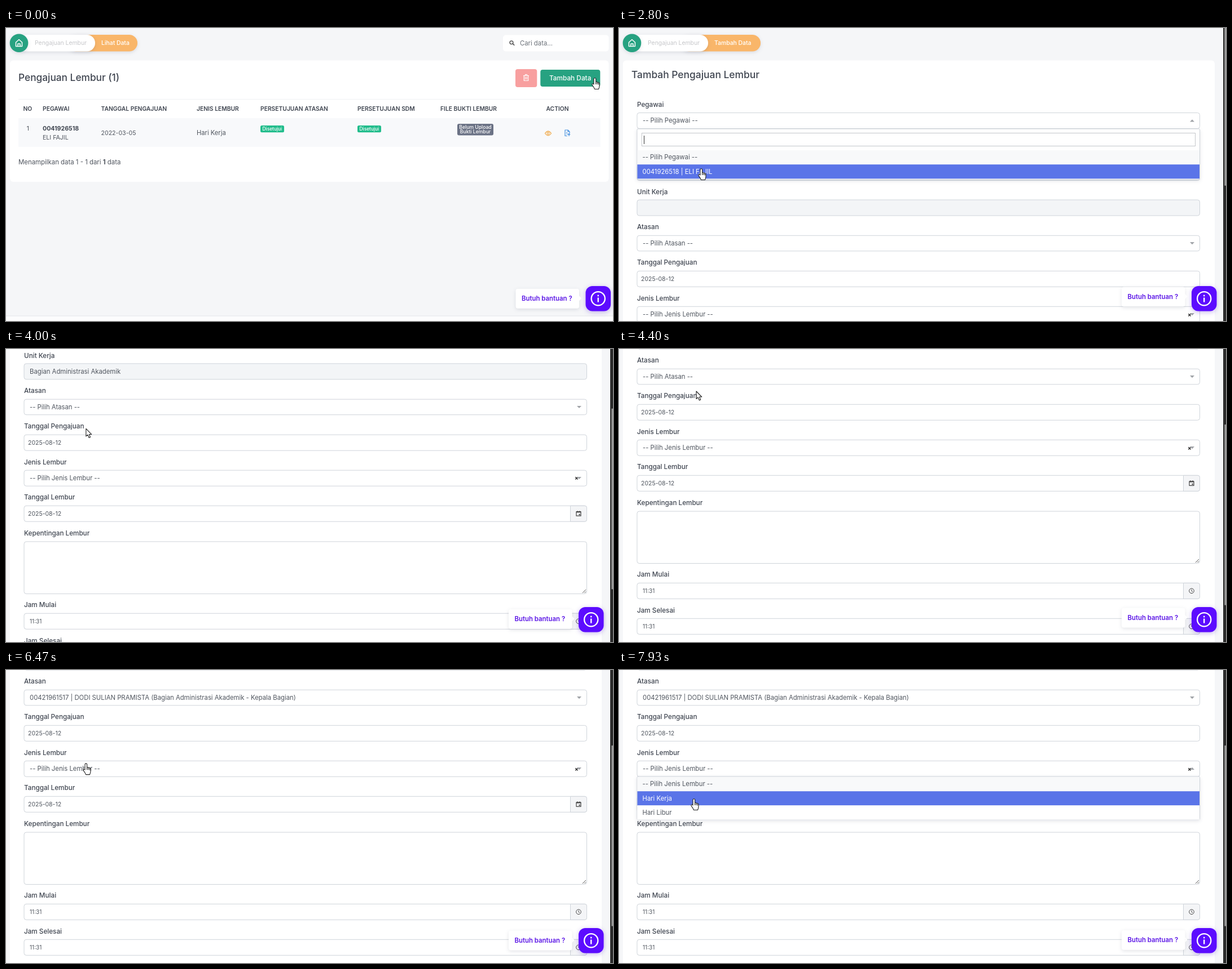
Animation of 1076 by 520 pixels, one loop 8 s. Source, as an HTML page:

```html
<!DOCTYPE html>
<html lang="id">
<head>
<meta charset="utf-8">
<title>Pengajuan Lembur</title>
<style>
html, body { margin: 0; width: 100%; height: 100%; overflow: hidden; background: #f5f6f8; }
svg { display: block; }
text { font-family: Inter, "Open Sans", sans-serif; white-space: pre; }
.soft { filter: drop-shadow(0 2px 3px rgba(40, 50, 80, .13)); }
.glow { filter: drop-shadow(0 2px 4px rgba(70, 20, 200, .3)); }
</style>
</head>
<body>
<svg id="stage" width="1076" height="520" viewBox="0 0 1076 520"></svg>
<script>
const LOOP = 8000, FORM_AT = 1670;
const DARK = '#3f4550', GREY = '#50565f', LINE = '#cfd4da', GREEN = '#27a281', BLUE = '#5a74e8', PURPLE = '#5c0cff';
const ID = '0041926518', NAME = 'ELI FAJIL', EMPLOYEE = `${ID} | ${NAME}`;
const MANAGER = '00421961517 | DODI SULIAN PRAMISTA (Bagian Administrasi Akademik - Kepala Bagian)';

// y is the middle of the capitals
const text = (x, y, s, size = 11.4, fill = GREY, weight = 400, extra = '') =>
  `<text x="${x}" y="${y + size * .36}" font-size="${size}" fill="${fill}" font-weight="${weight}" ${extra}>${s}</text>`;
const rect = (x, y, w, h, fill, r = 0, extra = '') =>
  `<rect x="${x}" y="${y}" width="${w}" height="${h}" rx="${r}" fill="${fill}" ${extra}/>`;
const path = (d, stroke, width = 1, fill = 'none', extra = '') =>
  `<path d="${d}" stroke="${stroke}" stroke-width="${width}" fill="${fill}" stroke-linejoin="round" ${extra}/>`;
const group = (id, body, extra = '') => `<g id="${id}" ${extra}>${body}</g>`;
const box = (y, h = 28, fill = '#fff') => rect(32, y, 997.5, h, fill, 4, `stroke="${LINE}"`);

function breadcrumb(last, end) {
  return rect(110, 12, end - 110, 29.5, '#f9b66a', 14.7, 'class="soft"') +
    rect(20, 12, 138, 29.5, '#fff', 14.7, 'class="soft"') +
    `<circle cx="23" cy="26.8" r="16.3" fill="${GREEN}" class="soft"/>` +
    path('M17.5 25.5l5.5-5 5.5 5v7h-11zM21 32.5v-4.5h4v4.5', '#fff', 1.5) +
    text(51, 26.3, 'Pengajuan Lembur', 10.4, '#c6c7ca') +
    text(169, 26.3, last, 10.4, '#fff', 500);
}

function listPage() {
  const heads = [[30.5, 'NO'], [65, 'PEGAWAI'], [168.5, 'TANGGAL PENGAJUAN'], [338, 'JENIS LEMBUR'],
    [451, 'PERSETUJUAN ATASAN'], [623, 'PERSETUJUAN SDM'], [770, 'FILE BUKTI LEMBUR'], [957.5, 'ACTION']];
  const approved = x => rect(x, 173, 42, 12.3, '#22bd8c', 2.5) + text(x + 3.5, 179, 'Disetujui', 8.4, '#fff', 500);
  const middle = 'text-anchor="middle"';
  return breadcrumb('Lihat Data', 233) +
    rect(881, 12.5, 187.5, 29, '#fff', 5) +
    path('M898.6 28l2.6 2.8', '#444', 1.5) +
    '<circle cx="896" cy="25.8" r="2.9" fill="none" stroke="#444" stroke-width="1.3"/>' +
    text(911, 27, 'Cari data...', 11.3, '#6a7078') +
    rect(7, 57.5, 1061.5, 215.5, '#fff', 6) +
    text(22, 88, 'Pengajuan Lembur (1)', 17.3, DARK, 500) +
    rect(903, 73, 38.3, 32, '#f89f9f', 4) +
    path('M917 84.5h10M920.5 84v-1.5h3v1.5M918.3 84.5v9h7.4v-9M920.7 86.5v5M923.3 86.5v5', '#fff', 1.2) +
    rect(947.3, 74, 106, 30, GREEN, 4) +
    group('ring', rect(946.6, 73.2, 107.4, 31.6, 'none', 5, 'stroke="#9fdcc8" stroke-width="2"')) +
    text(963, 88.3, 'Tambah Data', 11.8, '#fff', 500) +
    rect(22, 126, 1031.5, 1, '#f0f1f4') +
    heads.map(([x, s]) => text(x, 143.5, s, 10.3, DARK, 600)).join('') +
    rect(22, 160, 1031.5, 51, '#f8f9fb') +
    text(36.5, 178, '1', 11) +
    text(65, 178, ID, 10.6, DARK, 700) +
    text(65, 194, NAME, 10.6) +
    text(168.5, 186, '2022-03-05', 10.6) +
    text(338, 186, 'Hari Kerja', 11.2) +
    approved(451) + approved(623) +
    rect(800, 170, 64, 20.5, '#6b7285', 3) +
    text(832, 176.3, 'Belum Upload', 8.6, '#fff', 500, middle) +
    text(832, 184.3, 'Bukti Lembur', 8.6, '#fff', 500, middle) +
    path('M955.5 187q5.5-7.6 11 0q-5.5 7.6-11 0z', '#f0a94a', 1.2) +
    '<circle cx="961" cy="187" r="1.8" fill="none" stroke="#f0a94a" stroke-width="1.2"/>' +
    path('M995 191.5h-4v-10.5h5l3 3v3M996 181v3h3M993 185.5h2M993 188h3M998 192v-4.5m-2 2l2-2 2 2', '#4a93e0', 1.2) +
    text(22, 237.5, 'Menampilkan data 1 - 1 dari <tspan font-weight="700">1</tspan> data', 11.4) +
    rect(0, 511, 1076, 9, '#fcfcfd') + rect(0, 510.5, 1076, 1, '#e6e8ec');
}

const selectArrow = (id, y) => group(id, path('M-4-2h8l-4 4.2z', 'none', 0, '#a0a3a8'), `transform="translate(1016 ${y})"`);
const addon = y => path(`M1000.5 ${y}h25.5q3.5 0 3.5 3.5v21q0 3.5-3.5 3.5h-25.5z`, LINE, 1, '#f4f5f7');
const clock = y => addon(y) + `<circle cx="1015" cy="${y + 14}" r="4.3" fill="none" stroke="#444"/>` +
  path(`M1015 ${y + 11.5}v2.7l2 1.2`, '#444');
const calendar = y => addon(y) + path(`M1011 ${y + 10.5}h8v7.5h-8zM1011 ${y + 11.5}h8M1013 ${y + 9}v1.5M1017 ${y + 9}v1.5`, '#444', 1.2) +
  rect(1015.5, y + 14.5, 2.2, 2.2, '#444');

function formPage() {
  const label = (y, s) => text(32, y, s, 11.7, DARK, 500);
  const value = (y, s, id = '') => text(42, y, s, 11.3, GREY, 400, id && `id="${id}"`);
  const date = y => box(y) + text(39, y + 14, '2025-08-12', 10.5);
  const time = (y, s) => box(y) + text(42, y + 14, s, 10) + clock(y);
  return breadcrumb('Tambah Data', 251) +
    rect(7, 57.5, 1049, 900, '#fff', 6) +
    text(22, 83, 'Tambah Pengajuan Lembur', 17.4, DARK, 500) +
    label(136, 'Pegawai') + box(150.5) + value(164.3, '', 'employee') + selectArrow('arrow0', 164.5) +
    rect(32, 191, 998, 1, '#f0f1f4') +
    label(227.5, 'Jabatan Struktural') + box(242.5, 28, '#f3f5f7') + value(256, '', 'position') +
    label(290.5, 'Unit Kerja') + box(305, 28, '#f3f5f7') + value(318.8, '', 'unit') +
    label(353, 'Atasan') + box(368.3, 27.5) + value(381.8, '', 'manager') + selectArrow('arrow1', 382) +
    label(415.5, 'Tanggal Pengajuan') + date(431.3) +
    label(479.5, 'Jenis Lembur') + box(494.3) + value(507.8, '-- Pilih Jenis Lembur --') +
    text(1008, 508, '×', 10, '#333', 800) + selectArrow('arrow2', 508) +
    label(542, 'Tanggal Lembur') + date(557.3) + calendar(557.3) +
    label(605.5, 'Kepentingan Lembur') + box(621, 92.5) + path('M1022 712l6-6M1025.5 712l2.5-2.5', '#555') +
    label(733, 'Jam Mulai') + time(748.3, '11:31') +
    label(796.5, 'Jam Selesai') + time(811.3, '11:31');
}

// Menus of the three select boxes; `marks` lists when each row lights up
const menus = [
  { y: 179, search: true, open: 2250, close: 2930, rows: ['-- Pilih Pegawai --', EMPLOYEE], marks: [[0, 0], [2480, 1]] },
  { y: 396, search: true, open: 4750, close: 5900, rows: ['-- Pilih Atasan --', MANAGER], marks: [[0, 0], [5400, 1]] },
  { y: 522, open: 6700, close: LOOP, rows: ['-- Pilih Jenis Lembur --', 'Hari Kerja', 'Hari Libur'],
    marks: [[0, 0], [7250, 1], [7550, 2], [7870, 1]] },
];
function menu({ y, search, rows }, n) {
  const top = y + (search ? 38 : 1), row = 25.2;
  return group('menu' + n,
    rect(32, y, 997.5, top - y + rows.length * row + (search ? 1.5 : 0), '#fff', 2, `stroke="${LINE}" class="soft"`) +
    (search ? rect(40.5, y + 7.5, 981, 23, '#fff', 0, 'stroke="#c3c6ca"') +
      group('caret' + n, rect(44, y + 12, 1, 15, '#333')) : '') +
    rows.map((s, i) => rect(32.5, top + i * row, 996.5, row, '#fff') +
      text(41.5, top + i * row + 12.3, s, 11.3)).join(''));
}

const help = rect(903.5, -16.5, 112.5, 35, '#fff', 4, 'class="soft"') + path('M1016-4l4 4.5-4 4.5z', 'none', 0, '#fff') +
  text(914, 1, 'Butuh bantuan ?', 11.4, '#5a14e6', 600);
const helpButton = rect(1027.5, 458, 44.5, 44.5, PURPLE, 12, 'class="glow"') +
  '<circle cx="1049.7" cy="480.2" r="12.1" fill="none" stroke="#fff" stroke-width="2.3"/>' +
  rect(1048.5, 478.5, 2.4, 8, '#fff') + rect(1048.5, 473.7, 2.4, 2.6, '#fff');
const cursors = {
  hand: path('M-2 11V1.5a1.8 1.8 0 0 1 3.6 0V7a1.4 1.4 0 0 1 2.4.6a1.3 1.3 0 0 1 2.2.8a1.2 1.2 0 0 1 1.8 1.2V13q0 3-1.5 6.5H-.5Q-1.500 16.5-4.700 12.3c-1.3-2 .9-3.200 2-2zM1.6 7v4M4 8v3M6.200 9v2.500', '#222', 1.1, '#fff'),
  arrow: path('M0 0V13.5l3-2.7 2.3 5.2 2.4-1-2.2-5H9.7z', '#222', 1.1, '#fff'),
  beam: path('M-3-6.5h2.2L0-5.7.8-6.5H3M0-5.7V5.7M-3 6.5h2.2L0 5.7.8 6.5H3', '#222', 1.4),
};

const $ = id => document.getElementById(id);
$('stage').innerHTML = group('list', listPage()) +
  group('form', group('page', formPage() + menus.map(menu).join('')) +
    rect(1071, 0, 5, 520, '#2b2b2b') + '<rect id="thumb" x="1073.3" width="2.7" height="321" rx="1.3" fill="#9c9c9c"/>') +
  group('help', group('bubble', help) + helpButton) +
  Object.keys(cursors).map(k => group(k, cursors[k])).join('');

// time, x, y and, where it changes, the pointer shape
const moves = [[0, 1044, 89, 'hand'], [200, 1044, 89], [300, 945, 76, 'arrow'], [560, 650, 66], [870, 399, 80],
  [1300, 240, 101], [1670, 240, 101], [1850, 228, 82], [2120, 150, 152, 'hand'], [2250, 150, 160], [2600, 146, 250],
  [2930, 146, 250, 'beam'], [3300, 148, 226], [3650, 148, 226, 'arrow'], [4300, 137, 75], [4400, 137, 75],
  [4600, 140, 50, 'hand'], [4800, 140, 50], [5050, 142, 70], [5500, 140, 135], [5900, 140, 135],
  [6100, 140, 123, 'beam'], [6250, 141, 140, 'arrow'], [6330, 142, 162, 'hand'], [6420, 142, 166], [6750, 142, 168],
  [6930, 140, 191], [7300, 136, 226], [7550, 134, 246], [7780, 134, 248], [7870, 133, 229], [LOOP, 133, 229]];
const scrolls = [[0, 0], [3300, 0], [3600, 80.5], [3650, 80.5], [4150, 333], [LOOP, 333]];

function at(keys, t, col) {
  const i = Math.max(1, keys.findIndex(k => k[0] > t));
  const [a, b] = [keys[i - 1], keys[i]];
  const p = (t - a[0]) / (b[0] - a[0]);
  return a[col] + (b[col] - a[col]) * p * p * (3 - 2 * p);
}
const latest = (keys, t) => keys.filter(k => k[0] <= t).pop();
const show = (id, on) => $(id).style.display = on ? '' : 'none';
const shift = (id, x, y) => $(id).setAttribute('transform', `translate(${x} ${y})`);

function draw(t) {
  const onForm = t >= FORM_AT, scroll = at(scrolls, t, 1);
  show('list', !onForm);
  show('form', onForm);
  show('ring', t >= 130);
  shift('page', 0, -scroll);
  $('thumb').setAttribute('y', -41 + .525 * scroll);

  const chosen = t >= menus[0].close;
  $('employee').textContent = chosen ? EMPLOYEE : menus[0].rows[0];
  $('position').textContent = chosen ? 'Staff' : '';
  $('unit').textContent = chosen ? 'Bagian Administrasi Akademik' : '';
  $('manager').textContent = t >= menus[1].close ? MANAGER : menus[1].rows[0];

  menus.forEach((m, n) => {
    const open = t >= m.open && t < m.close;
    show('menu' + n, open);
    $('arrow' + n).firstChild.setAttribute('transform', open ? 'scale(1 -1)' : '');
    if (m.search) show('caret' + n, (t - m.open) % 1060 < 600);
    const lit = latest(m.marks, t)[1], nodes = [...$('menu' + n).children].slice(-2 * m.rows.length);
    m.rows.forEach((_, i) => {
      nodes[2 * i].setAttribute('fill', i === lit ? BLUE : i ? '#fff' : '#f8f9fa');
      nodes[2 * i + 1].setAttribute('fill', i === lit ? '#fff' : GREY);
    });
  });

  const phase = 2 * Math.PI * (onForm ? t - 3646 : t - 240) / 1550;
  shift('help', onForm ? -12.5 : 0, 0);
  shift('bubble', 0, 478 + 2 * Math.cos(phase));

  const kind = latest(moves.filter(m => m[3]), t)[3];
  for (const k in cursors) show(k, k === kind);
  shift(kind, at(moves, t, 1), at(moves, t, 2));
}

function tick() {
  draw(performance.now() % LOOP);
  requestAnimationFrame(tick);
}
tick();
</script>
</body>
</html>
```
